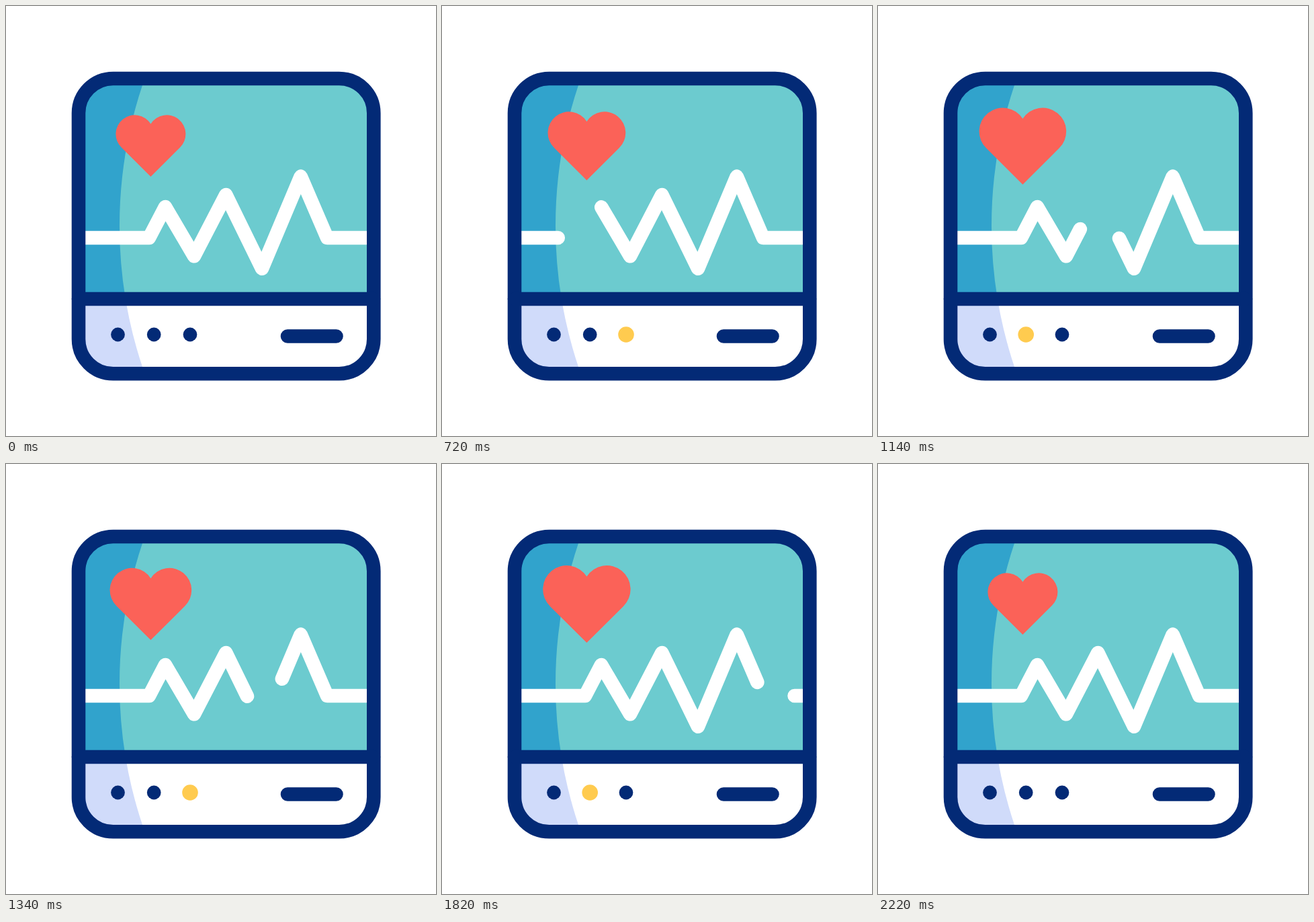
An HTML page that plays this animation: 640 by 640 pixels, repeating every 2.4 s.

```html
<!DOCTYPE html>
<html lang="en">
<head>
<meta charset="utf-8">
<title>Heart monitor</title>
<style>
  html, body { margin: 0; height: 100%; overflow: hidden; background: #fff; }
  svg { display: block; width: 100%; height: 100%; }
  .line { fill: none; stroke-width: 20.6; stroke-linecap: round; stroke-linejoin: round; }
  .navy { stroke: #032a76; }
  .dot { fill: #032a76; }
  .dot.on { fill: #ffcb4f; }
</style>
</head>
<body>
<svg viewBox="0 0 640 640">
  <!-- screen and base, each with its shaded left side -->
  <clipPath id="inside"><rect x="108" y="108" width="439.5" height="439.5" rx="51.5"/></clipPath>
  <clipPath id="screen"><path d="M97 97H558V436H97z"/></clipPath>
  <g clip-path="url(#inside)">
    <path id="shade" fill="#d0dbfa" d="M97 118H203A662 662 0 0 0 203 537V548H97z"/>
    <g clip-path="url(#screen)">
      <path fill="#6ccbcf" d="M97 97H558V436H97z"/>
      <path fill="#31a3cc" d="M97 97H210L203 118A662 662 0 0 0 203 537H97z"/>
    </g>
  </g>

  <path id="heart" fill="#fb6258"
    d="M215.4 175.4A28.2 28.2 0 1 0 172 210.8L215.4 254 258.8 210.8A28.2 28.2 0 1 0 215.4 175.4z"/>
  <path id="pulse" class="line" stroke="#fff" pathLength="1"
    d="M108 345H213L237 299 280 372.3 327.3 281 381 390.7 438.7 253.7 478 345H547"/>

  <rect class="line navy" x="108" y="108" width="439.3" height="439.3" rx="51.5"/>
  <path class="line navy" d="M108 436H547M419 491.5H491.5"/>
  <circle class="dot" cx="166.5" cy="489"/>
  <circle class="dot" cx="220.2" cy="489"/>
  <circle class="dot" cx="274" cy="489"/>
</svg>
<script>
const LOOP = 2400, STEP = 20, START = 202, LENGTH = 2000;
const BEAT = LENGTH / 3, SWEEP = 1800, LAG = 200;
const heart = document.getElementById('heart');
const pulse = document.getElementById('pulse');
const dots = document.querySelectorAll('.dot');

const ease = u => {
  u = Math.min(1, Math.max(0, u));
  return u * u * (3 - 2 * u);
};

function draw(time) {
  const t = Math.floor(time % LOOP / STEP) * STEP - START;
  const active = t >= 0 && t < LENGTH;
  const phase = active ? t % BEAT / BEAT : 0;

  // swell and shrink once per beat
  const scale = 1 + 0.27 * ease(1 - Math.abs(2 * phase - 1));
  heart.setAttribute('transform', `translate(215.4 206.5) scale(${scale}) translate(-215.4 -206.5)`);

  // a gap runs along the line, its tail later than its head
  const head = ease(t / SWEEP), tail = ease((t - LAG) / SWEEP);
  pulse.setAttribute('stroke-dasharray', head > tail ? `${tail} ${head - tail} 1 0` : 'none');

  dots.forEach((dot, i) => {
    const on = active && Math.floor(phase * 3) === i;
    dot.classList.toggle('on', on);
    dot.setAttribute('r', on ? 11.8 : 10.4);
  });
}

const begin = performance.now();
function tick() {
  draw(performance.now() - begin);
  requestAnimationFrame(tick);
}
tick();
</script>
</body>
</html>
```
